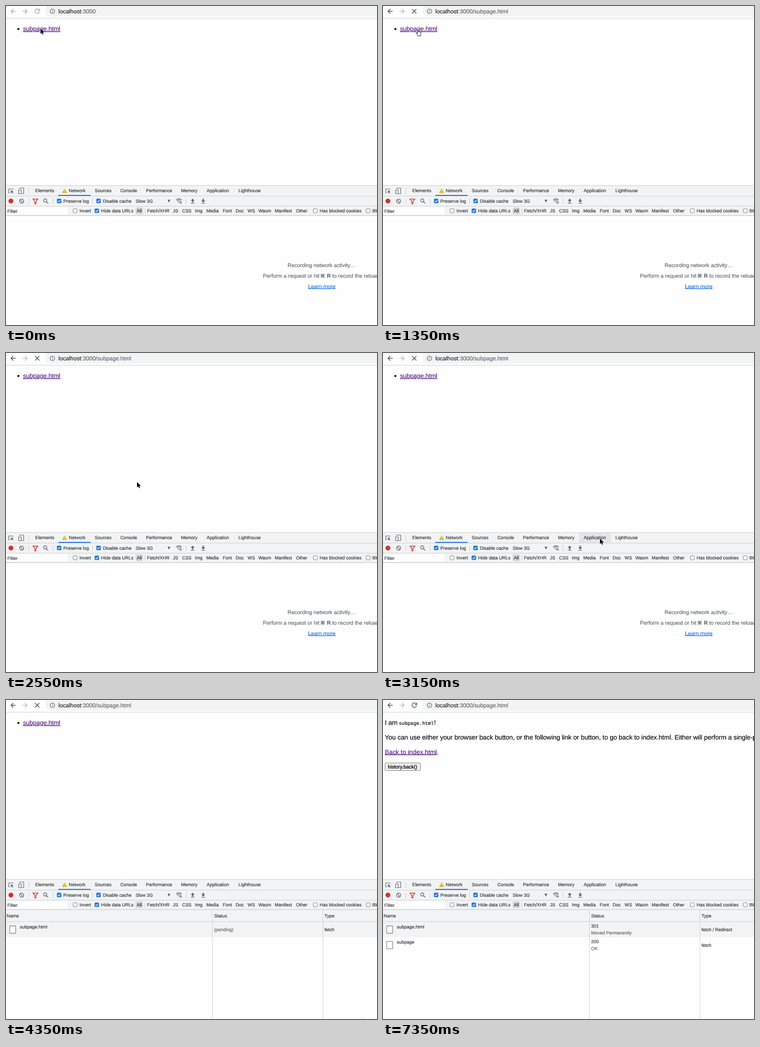
Write an HTML page that moves like this. It is 807 px wide and 694 px high and loops after 8250 ms.

```html
<!DOCTYPE html>
<html lang="en">
<head>
<meta charset="utf-8">
<title>Slow navigation with the network panel</title>
<style>
html, body { margin: 0; width: 100%; height: 100%; overflow: hidden; background: #fefefe; }
svg { display: block; width: 100%; height: 100%; }
text {
  font: 9.95px "Liberation Sans", Arial, sans-serif;
  color: #303134; fill: currentColor; stroke: currentColor; stroke-width: .18;
  text-rendering: geometricPrecision; white-space: pre;
}
.page text { font-size: 14.1px; color: #000; }
.page .item { font-size: 13.5px; }
.page .note { font-size: 13.85px; }
.page .code { font: 10.55px "Liberation Mono", monospace; }
.page .btn { font-size: 10.8px; stroke-width: .3; }
.page .link { color: #551a8b; fill: #551a8b; stroke: #551a8b; text-decoration: underline; }
.url { font-size: 12.55px; color: #5f6368; }
.url.suffix { font-size: 12.3px; }
.host { fill: #202124; stroke: #202124; }
.hint text { font-size: 11.7px; color: #5f6368; }
.hint .more { color: #1a73e8; text-decoration: underline; }
.hint .key { font-weight: bold; }
.hint .cmd { font: bold 11px "DejaVu Sans", sans-serif; }
.bubble text { font-size: 10.65px; color: #3c4043; }
.soft { color: #5f6368; }
.line { fill: none; stroke: #cacdd1; }
.icon { fill: none; stroke: #5f6368; stroke-width: 1.2; }
.nav { fill: none; stroke-width: 1.5; }

/* One loop is 55 steps of 150 ms */
.anim { animation: 8.25s step-end infinite; }
.back { animation-name: back; }
.forward { animation-name: forward; }
.reload { animation-name: reload; }
.stop { animation-name: loading; }
.suffix { animation-name: clicked; }
.home { animation-name: home; }
.done { animation-name: done; }
.bubble { animation-name: bubble; }
.bubbleText { animation-name: bubbleText; }
.tabHover { animation-name: tabHover; }
.hint { animation-name: hint; }
.table { animation-name: requested; }
.wait1 { animation-name: wait1; }
.moved { animation-name: moved; }
.wait2 { animation-name: wait2; }
.hand { animation-name: hand; }
.arrow { animation-name: arrow; }

@keyframes back { 0% { stroke: #adafb2 } 7.27%, 100% { stroke: #47494c } }
@keyframes forward { 0% { stroke: #adafb2 } 7.27% { stroke: #47494c } 16.36%, 100% { stroke: #b9bbbe } }
@keyframes reload {
  0% { stroke: #a3a5a8; opacity: 1 } 7.27% { stroke: #47494c; opacity: 1 }
  16.36% { stroke: #47494c; opacity: 0 } 89.09%, 100% { stroke: #47494c; opacity: 1 }
}
@keyframes loading { 0% { opacity: 0 } 16.36% { opacity: 1 } 89.09%, 100% { opacity: 0 } }
@keyframes clicked { 0% { opacity: 0 } 16.36%, 100% { opacity: 1 } }
@keyframes home { 0% { opacity: 1 } 89.09%, 100% { opacity: 0 } }
@keyframes done { 0% { opacity: 0 } 89.09%, 100% { opacity: 1 } }
@keyframes bubble { 0% { opacity: 0 } 18.18% { opacity: 1 } 30.9%, 100% { opacity: 0 } }
@keyframes bubbleText { 0% { opacity: .6 } 20% { opacity: 1 } 29.09%, 100% { opacity: .6 } }
@keyframes tabHover { 0% { opacity: 0 } 38.18% { opacity: 1 } 41.81%, 100% { opacity: 0 } }
@keyframes hint { 0% { opacity: 1 } 41.81%, 100% { opacity: 0 } }
@keyframes requested { 0% { opacity: 0 } 41.81%, 100% { opacity: 1 } }
@keyframes wait1 { 0% { opacity: 1 } 65.45%, 100% { opacity: 0 } }
@keyframes moved { 0% { opacity: 0 } 65.45%, 100% { opacity: 1 } }
@keyframes wait2 { 0% { opacity: 1 } 89.09%, 100% { opacity: 0 } }
@keyframes hand { 0% { opacity: 0 } 16.36% { opacity: 1 } 25.45%, 100% { opacity: 0 } }
@keyframes arrow {
  0% { transform: translate(74px, 48px); opacity: 1 }
  16.36% { transform: translate(74px, 48px); opacity: 0 }
  25.45% { transform: translate(250px, 230px); opacity: 1 }
  27.27% { transform: translate(284px, 280px) }
  34.54% { transform: translate(341.5px, 285px) }
  36.36% { transform: translate(471px, 403px) }
  40% { transform: translate(549px, 417px) }
  41.81% { transform: translate(657.5px, 541px) }
  45.45% { transform: translate(714px, 559px) }
  47.27% { transform: translate(726px, 607px) }
  49.09% { transform: translate(735px, 653px) }
  50.9% { transform: translate(775px, 690px) }
  52.72% { transform: translate(775px, 692px) }
  54.54% { transform: translate(778px, 692px); opacity: 1 }
  56.36%, 100% { transform: translate(778px, 692px); opacity: 0 }
}
</style>
</head>
<body>
<svg viewBox="0 0 807 694">
  <defs>
    <rect id="box" x=".5" y=".5" width="8.6" height="8.6" rx="1.5" fill="#fff" stroke="#767676"/>
    <g id="checked">
      <rect width="9.6" height="9.6" rx="1.7" fill="#1a73e8"/>
      <path d="M2 5l2 2L7.700 2.600" fill="none" stroke="#fff" stroke-width="1.4"/>
    </g>
    <rect id="file" x="8" y="1" width="13" height="16" rx=".8" fill="#fff" stroke="#7d8083" stroke-width="1.3"/>
    <path id="backArrow" d="M21 11.5H11M15.9 6.5L10.9 11.5L15.9 16.5"/>
  </defs>
  <rect width="807" height="694" fill="#fefefe"/>

  <!-- Address bar -->
  <path d="M807 0H87.5C86 4 85.5 17 90 20.5Q93 23 98 23H807Z" fill="#f1f3f4"/>
  <path class="line" d="M0 26.5H807" stroke="#dadce0"/>
  <use href="#backArrow" class="nav anim back"/>
  <use href="#backArrow" class="nav anim forward" transform="translate(57) scale(-1 1)"/>
  <g class="nav anim reload">
    <path d="M72.3 8.3A5 5 0 1 0 73 12.7"/>
    <path d="M73.3 6V10.2H69.2"/>
  </g>
  <path class="nav anim stop" d="M63.3 6.8L72.7 16.2M72.7 6.8L63.3 16.2" stroke="#47494c"/>
  <g class="icon">
    <circle cx="101" cy="11.6" r="4.9"/>
    <path d="M101 10.9V14.3M101 8.5V9.9"/>
  </g>
  <text class="url" x="114" y="16"><tspan class="host">localhost</tspan>:3000</text>
  <text class="url anim suffix" x="195" y="16">/subpage.html</text>

  <!-- Page content -->
  <g class="page anim home">
    <circle cx="27" cy="50" r="2.3"/>
    <text class="item link" x="37" y="54">subpage.html</text>
  </g>
  <g class="page anim done">
    <text x="4" y="54">I am</text>
    <text class="code" x="34.5" y="54">subpage.html</text>
    <text x="111" y="54">!</text>
    <text x="4" y="86">You can use either your browser back button, or the following link or button, to go back to index.html. Either will perform a single-page navigation.</text>
    <text class="note" x="4" y="117.5"><tspan class="link">Back to index.html</tspan>.</text>
    <rect x="4.5" y="137" width="77" height="16.5" rx="2" fill="#efefef" stroke="#767676"/>
    <text class="btn" x="10.5" y="149">history.back()</text>
  </g>
  <g class="bubble anim">
    <path d="M0 373.5H140.5Q143.5 373.5 143.5 376.5V391H0Z" fill="#dee1e6" stroke="#c3c6cb"/>
    <text class="anim bubbleText" x="1.5" y="386">localhost:3000/subpage.html</text>
  </g>

  <!-- Tools: bars -->
  <rect y="391" width="807" height="65" fill="#f1f3f4"/>
  <rect class="anim tabHover" x="427" y="391" width="69" height="22" fill="#e3e5e8"/>
  <path class="line" d="M0 390.5H807M0 413.5H807M0 435.5H807M49.5 396V409M49.5 418V431M102.5 418V431M188.5 418V431M391.5 418V431M302.5 440V452"/>
  <rect y="436.5" width="134" height="17.5" fill="#fff"/>
  <path class="line" d="M0 456H807" style="stroke:#b5b8bb"/>

  <!-- Tabs -->
  <g class="icon">
    <path d="M15 400V398H6V406.5H9"/>
    <path d="M10 401L16.5 403.7L13.7 404.7L16 407.5L15 408.2L12.8 405.5L11.4 407.8Z" fill="#5f6368" stroke="none"/>
    <path d="M30 398V396H38.5V408H34M27.5 400H33V408.5H27.5Z"/>
  </g>
  <text x="63.5" y="405.4">Elements</text>
  <path d="M127.5 397.5L132.3 406.3H122.7Z" fill="#e5b000" stroke="#e5b000" stroke-linejoin="round" stroke-width=".8"/>
  <path d="M127.5 400V403.3M127.5 404.3V405.5" stroke="#fff" stroke-width="1.1"/>
  <text x="136.5" y="405.4">Network</text>
  <rect x="114" y="411" width="70" height="2" fill="#1a73e8"/>
  <text x="193" y="405.4">Sources</text>
  <text x="248.7" y="405.4">Console</text>
  <text x="304.5" y="405.4">Performance</text>
  <text x="380.7" y="405.4">Memory</text>
  <text x="436.5" y="405.4">Application</text>
  <text x="505.5" y="405.4">Lighthouse</text>

  <!-- Recording toolbar -->
  <circle cx="10.7" cy="424.3" r="5.3" fill="#d93025"/>
  <g class="icon">
    <circle cx="34" cy="424.5" r="4.5" stroke-width="1.4"/>
    <path d="M30.8 421.3L37.2 427.7" stroke-width="1.4"/>
    <path d="M58.7 420H69.3L65.3 425V430.5H62.7V425Z" stroke="#d93025" stroke-width="1.5"/>
    <circle cx="85.3" cy="423" r="3.5" stroke-width="1.4"/>
    <path d="M88 425.7L91.7 429.5" stroke-width="1.6"/>
    <path d="M369.8 422Q376 416.5 382.2 422M371.8 424.3Q376 420.5 380 423.2M373.8 426.4Q375.5 425 377 426" stroke-width="1.3"/>
    <circle cx="379.7" cy="427.3" r="1.9" stroke-width="1.7" stroke-dasharray="1.5 .5"/>
  </g>
  <g fill="#5f6368">
    <path d="M351.3 421.5H357.5L354.4 427.5Z"/>
    <path d="M406 419.2L410.3 423.7H407.3V427.5H404.7V423.7H401.7ZM402 428.5H410V429.8H402Z"/>
    <path d="M429 427.5L433.3 423H430.3V419.2H427.7V423H424.7ZM425 428.5H433V429.8H425Z"/>
  </g>
  <use href="#checked" x="110.8" y="419.3"/>
  <text x="124.7" y="427.8">Preserve log</text>
  <use href="#checked" x="196.5" y="419.3"/>
  <text x="210.7" y="427.8">Disable cache</text>
  <text x="282" y="427.8">Slow 3G</text>

  <!-- Filter bar -->
  <text x="3" y="449.7">Filter</text>
  <use href="#box" x="145.5" y="440.7"/>
  <text x="160" y="449">Invert</text>
  <use href="#checked" x="192.8" y="440.7"/>
  <text x="207" y="449">Hide data URLs</text>
  <rect x="282" y="438" width="16" height="15" rx="4" fill="#d5d7da"/>
  <text x="284.5" y="449">All</text>
  <text x="307" y="449">Fetch/XHR</text>
  <text x="363" y="449">JS</text>
  <text x="383" y="449">CSS</text>
  <text x="411" y="449">Img</text>
  <text x="435.7" y="449">Media</text>
  <text x="471.5" y="449">Font</text>
  <text x="499.5" y="449">Doc</text>
  <text x="525.5" y="449">WS</text>
  <text x="549" y="449">Wasm</text>
  <text x="584.5" y="449">Manifest</text>
  <text x="630.7" y="449">Other</text>
  <use href="#box" x="668" y="440.7"/>
  <text x="682.3" y="449">Has blocked cookies</text>
  <use href="#box" x="783" y="440.7"/>
  <text x="797" y="449">Blocked Requests</text>

  <!-- Empty request list -->
  <g class="hint anim">
    <text x="612.5" y="567.8">Recording network activity…</text>
    <text x="559" y="590.8">Perform a request or hit</text>
    <text class="cmd" x="683.7" y="590.8">⌘</text>
    <text class="key" x="698" y="590.8">R</text>
    <text x="709.5" y="590.8">to record the reload.</text>
    <text class="more" x="657" y="613.5">Learn more</text>
  </g>

  <!-- Request table -->
  <g class="table anim">
    <rect y="457" width="807" height="25" fill="#f1f3f4"/>
    <rect y="482" width="807" height="34" fill="#f2f3f4"/>
    <path class="line" d="M0 482H807M449 457V694M689.5 457V694"/>
    <text x="1.5" y="472.7">Name</text>
    <text x="452.7" y="472.7">Status</text>
    <text x="692.7" y="472.7">Type</text>
    <use href="#file" y="490.5"/>
    <text x="30" y="496.7">subpage.html</text>
    <g class="anim wait1">
      <text class="soft" x="452.7" y="502.7">(pending)</text>
      <text x="692.7" y="502.7">fetch</text>
    </g>
    <g class="anim moved">
      <text x="452.7" y="495.4">301</text>
      <text class="soft" x="452.7" y="510.2">Moved Permanently</text>
      <text x="692.7" y="502.7">fetch / Redirect</text>
      <use href="#file" y="524.2"/>
      <text x="30" y="530.3">subpage</text>
      <text x="692.7" y="536.5">fetch</text>
      <text class="soft anim wait2" x="452.7" y="536.5">(pending)</text>
      <g class="anim done">
        <text x="452.7" y="529">200</text>
        <text class="soft" x="452.7" y="544">OK</text>
      </g>
    </g>
  </g>

  <!-- Pointers -->
  <path class="anim hand" d="M75.3 60V52.8Q75.3 51.6 76.3 51.6T77.3 52.8V56.2Q78.5 55.3 79.3 56.6Q80.7 55.9 81.2 57.2Q82.7 56.9 82.7 58.6Q82.7 61.5 81.5 63V65.2H75.7V63.5Q73.6 61.5 71.9 58.8Q71.8 57.4 73.3 58Z" fill="#fff" stroke="#000"/>
  <path class="anim arrow" d="M1 .8V12.4L3.7 9.9L5.6 14.2L7.6 13.3L5.7 9.2H9.4Z" fill="#000" stroke="#fff" paint-order="stroke"/>
</svg>
</body>
</html>
```
